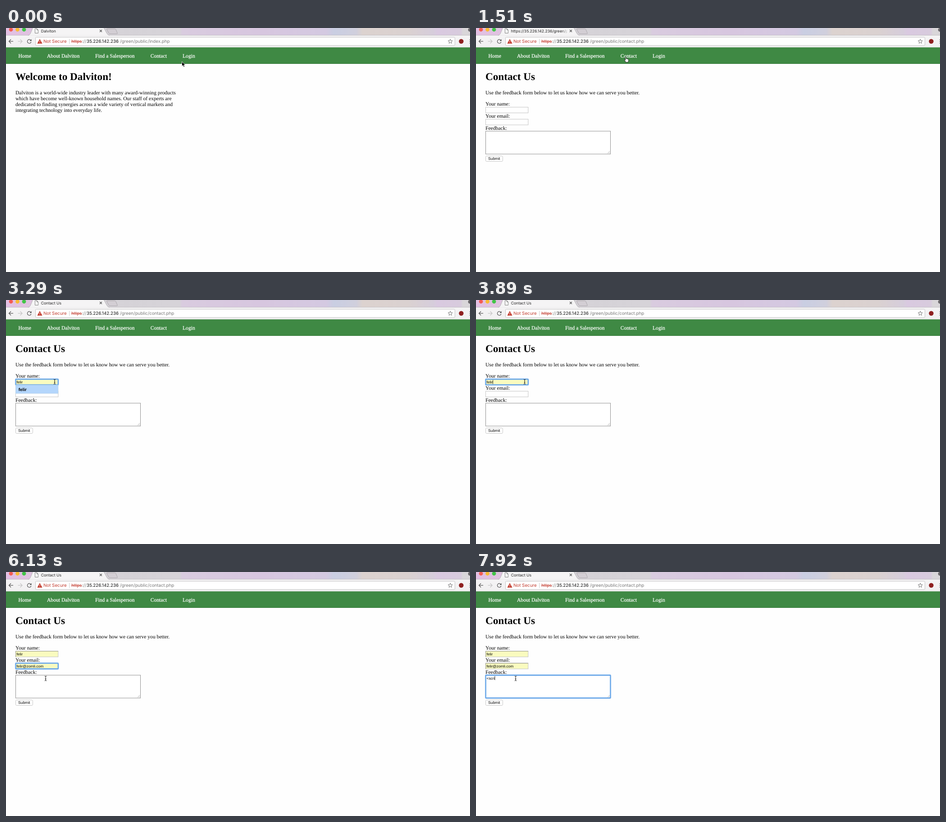
An HTML page for the animation above (8 s loop, 1030 by 544 pixels).

```html
<!DOCTYPE html>
<html lang="en">
<head>
<meta charset="utf-8">
<title>Contact form</title>
<style>
  html, body { margin: 0; width: 100%; height: 100%; overflow: hidden; background: #fefefe; }
  svg { display: block; width: 1030px; height: 544px; text-rendering: geometricPrecision; }
  .page text { font: 11.6px "Liberation Serif", "Times New Roman", serif; }
  .page .h1 { font-size: 23.2px; font-weight: bold; }
  .nav text { fill: #fff; stroke: #fff; stroke-width: .25px; }
  .ui text { font: 9.75px Inter, Roboto, sans-serif; }
  .ui .title { font-size: 8.6px; fill: #222; }
  .page .field { font: 8.4px "Liberation Sans", Arial, sans-serif; }
  .page .pick { font: bold 9.8px "Liberation Sans", Arial, sans-serif; }
  .line { fill: none; stroke: #5a5a5a; stroke-width: 1.3; }
  .ring { fill: none; stroke: #5b9ee6; stroke-width: 1.8; }
  .glow { fill: none; stroke: #a9cdf3; stroke-width: 3.4; opacity: .7; }
  .caret { stroke: #000; stroke-width: .8; }
</style>
</head>
<body>
<svg viewBox="0 0 1030 544">
  <defs>
    <linearGradient id="strip">
      <stop offset="0" stop-color="#e3bfe3"/>
      <stop offset=".055" stop-color="#dfc3e0"/>
      <stop offset=".2" stop-color="#d5d2d7"/>
      <stop offset=".374" stop-color="#d6d3d8"/>
      <stop offset=".38" stop-color="#d9cbdf"/>
      <stop offset=".55" stop-color="#d7c6df"/>
      <stop offset=".69" stop-color="#d4c9e1"/>
      <stop offset=".707" stop-color="#c9cee2"/>
      <stop offset=".755" stop-color="#d0cfdd"/>
      <stop offset=".768" stop-color="#dcd2cf"/>
      <stop offset=".865" stop-color="#dad1d0"/>
      <stop offset=".92" stop-color="#d6cddb"/>
      <stop offset=".93" stop-color="#d9c9e0"/>
      <stop offset=".98" stop-color="#d8cbdd"/>
      <stop offset=".985" stop-color="#d9d6d9"/>
    </linearGradient>
    <linearGradient id="bar" x2="0" y2="1">
      <stop offset="0" stop-color="#f5f4f5"/>
      <stop offset="1" stop-color="#f1f0f1"/>
    </linearGradient>
    <linearGradient id="fade">
      <stop offset="0" stop-color="#f5f4f5" stop-opacity="0"/>
      <stop offset="1" stop-color="#f5f4f5"/>
    </linearGradient>
    <clipPath id="titleClip"><rect x="76" width="127" height="16"/></clipPath>
  </defs>

  <g class="page">
    <rect width="1030" height="544" fill="#fefefe"/>
    <g class="nav">
      <rect y="43" width="1030" height="37" fill="#3f8944"/>
      <rect y="79" width="1030" height="1" fill="#377a3c"/>
      <text x="27.5" y="66">Home</text>
      <text x="91" y="66">About Dalviton</text>
      <text x="198" y="66">Find a Salesperson</text>
      <text x="320.8" y="66">Contact</text>
      <text x="392" y="66">Login</text>
    </g>

    <g id="home">
      <text class="h1" x="21" y="116.3">Welcome to Dalviton!</text>
      <text x="21" y="148">Dalviton is a world-wide industry leader with many award-winning products</text>
      <text x="21" y="161">which have become well-known household names. Our staff of experts are</text>
      <text x="21" y="174">dedicated to finding synergies across a wide variety of vertical markets and</text>
      <text x="21" y="187">integrating technology into everyday life.</text>
    </g>

    <g id="contact">
      <text class="h1" x="21" y="116.3">Contact Us</text>
      <text x="21" y="148">Use the feedback form below to let us know how we can serve you better.</text>
      <text x="21" y="173">Your name:</text>
      <text x="21" y="200">Your email:</text>
      <text x="21" y="226.7">Feedback:</text>
      <rect x="21.5" y="230" width="277" height="51" fill="#fff" stroke="#8f8f8f"/>
      <path d="M292 279.5l5-5M295 279.5l2-2" stroke="#999" stroke-width=".8"/>
      <rect x="21.5" y="285.3" width="37.8" height="12.2" rx="2.2" fill="#fff" stroke="#c6c6c6"/>
      <text class="field" x="27" y="294.2" style="font-size:8.5px">Submit</text>
      <g id="form"></g>
    </g>
  </g>

  <g class="ui">
    <rect width="1030" height="17" fill="url(#strip)"/>
    <rect y="16" width="1030" height="27" fill="url(#bar)"/>
    <path d="M0 16.2H1030" stroke="#b5b2b6" stroke-width=".8"/>
    <path d="M0 43H1030" stroke="#c9d3c9" stroke-width=".6"/>
    <path d="M49 16.7C53 16 54.5 12 56 8L59.5 -1H217L223.500 11.500Q226 16 230 16.700Z" fill="#f5f4f5"/>
    <path d="M49 16.300C53 16 54.500 12 56 8L59.500 -1M217 -1L223.500 11.500Q226 16 230 16.300" fill="none" stroke="#a5a2a6" stroke-width=".8"/>
    <path d="M224.500 1.800H241.500Q243 1.800 243.800 3.300L247.300 11.500Q247.800 13 246 13H231Q229 13 228.200 11.500L223.600 3Q223.200 1.800 224.500 1.800Z" fill="#d3ced4" stroke="#a19ea2" stroke-width=".8"/>
    <circle cx="11" cy="3.500" r="4.400" fill="#f45d55"/>
    <circle cx="25.500" cy="3.500" r="4.400" fill="#f8bc34"/>
    <circle cx="40" cy="3.500" r="4.400" fill="#42c549"/>
    <path d="M64.500 1.500H68.500L71.300 4.300V11.500H64.500ZM68.500 1.500V4.300H71.300" fill="#fff" stroke="#707070" stroke-width=".9"/>
    <g clip-path="url(#titleClip)"><text class="title" id="title" x="77.700" y="9.500"></text></g>
    <rect x="190" y="1" width="14" height="14" fill="url(#fade)"/>
    <path d="M208 4l5 5m0-5l-5 5" stroke="#555" stroke-width="1.200"/>
    <circle cx="1030" cy="4" r="4.300" fill="#6b696c"/>

    <path class="line" d="M16 29.700H6.700M11 25.200L6.500 29.700L11 34.200"/>
    <path class="line" d="M26.500 29.700H35.800M31.500 25.200L36 29.700L31.500 34.200" style="stroke:#c6c5c6"/>
    <path class="line" d="M55.300 27.500A4.300 4.300 0 1 0 55.800 31"/>
    <path d="M56.600 24.800V29H52.400Z" fill="#5a5a5a"/>
    <rect x="65.500" y="20.500" width="931" height="18.500" rx="2" fill="#fff" stroke="#bdbbbd" stroke-width=".9"/>
    <path d="M75 25L80.200 34.500H69.800Z" fill="#c23a2d" stroke="#c23a2d" stroke-width=".6" stroke-linejoin="round"/>
    <path d="M75 28.300v2.800m0 1v1.200" stroke="#fff" stroke-width="1.100"/>
    <text x="83" y="33.300" fill="#c23a2d">Not Secure</text>
    <path d="M140.800 24V35.500" stroke="#c9c9c9"/>
    <text x="145" y="33.300" fill="#c23a2d">https</text>
    <path d="M145 30.300H169" stroke="#c23a2d" stroke-width=".9"/>
    <text x="168.800" y="33.300" fill="#777">://</text>
    <text x="179" y="33.300" fill="#111">35.226.142.236</text>
    <text id="path" x="253" y="33.300" fill="#777"></text>
    <path id="star" fill="none" stroke="#666" stroke-width=".9"/>
    <circle cx="1010.500" cy="29.800" r="5.200" fill="#8f2020"/>
    <path d="M1029.500 25.500v9" stroke="#777" stroke-width="1.600" stroke-dasharray="1.600 2.100"/>
  </g>

  <g id="pointer">
    <path id="arrow" d="M0 0V10.300L2.400 8L4 12L6 11.200L4.300 7.400H7.600Z" fill="#000" stroke="#fff" stroke-width=".8"/>
    <path id="hand" d="M-.900 .500Q0 -.800 .900 .500V4.200Q2 3.500 2.800 4.500Q4 3.900 4.600 5Q6 4.700 6.200 6V8.500Q6 10 5 11.800H0Q-1 9.500 -3 7.200Q-3 5.900 -1.800 6.300L-.900 7.200Z" fill="#fff" stroke="#111" stroke-width=".9"/>
    <path id="beam" d="M-2.200 -5.200Q0 -5.200 0 -4Q0 -5.200 2.200 -5.200M0 -4V4M-2.200 5.200Q0 5.200 0 4Q0 5.200 2.200 5.200M-1.300 1.200H1.300" fill="none" stroke="#111" stroke-width="1"/>
  </g>
</svg>
<script>
const LOOP = 8000;
const NAME = "felir", MAIL = "felir@zomli.com";
const $ = id => document.getElementById(id);
const show = (el, on) => el.setAttribute("visibility", on ? "inherit" : "hidden");

// pointer: time, shape, x, y
const moves = [
  [0, "arrow", 390.5, 75], [150, "arrow", 400, 75.5], [300, "arrow", 402.5, 75.5],
  [450, "arrow", 391, 72], [600, "arrow", 367, 63], [770, "arrow", 345, 58],
  [920, "hand", 327, 62], [1070, "hand", 332.5, 64.5],
  [1800, "arrow", 296, 88], [1950, "arrow", 190, 140], [2090, "beam", 108, 182.3],
  [5830, "beam", 102, 196], [5980, "beam", 91, 226], [6130, "beam", 88, 237.3]
];
const tabs = [[0, "Dalviton"], [1360, "https://35.226.142.236/green/public"], [1800, "Contact Us"]];

// fields: time, text, filled, list (1 open, 2 chosen), focus, caret
const nameSteps = [
  [0, "", 0, 0, 0, 0], [2240, "", 0, 0, 1, 1], [2840, NAME[0], 0, 1, 1, 1],
  [3290, NAME, 1, 2, 1, 0], [3890, NAME, 1, 0, 1, 1], [4190, NAME, 1, 0, 0, 0]
];
const mailSteps = [
  [0, "", 0, 0, 0, 0], [4190, "", 0, 0, 1, 1], [4640, MAIL[0], 0, 0, 1, 1],
  [4790, MAIL[0], 0, 1, 1, 1], [5090, MAIL, 1, 2, 1, 0], [5380, MAIL, 1, 0, 1, 1],
  [5830, MAIL, 1, 0, 1, 0], [6280, MAIL, 1, 0, 0, 0]
];
const noteSteps = [
  [0, "", 0, 0, 0, 0], [6280, "", 0, 0, 1, 1], [6720, "", 0, 0, 1, 0],
  ...[7020, 7320, 7470, 7770, 7920].map((t, i) => [t, "<scri".slice(0, i + 1), 0, 0, 1, 1])
];

const at = (steps, t) => steps.filter(s => s[0] <= t).pop();

function add(parent, tag, attrs, text) {
  const el = document.createElementNS("http://www.w3.org/2000/svg", tag);
  for (const k in attrs) el.setAttribute(k, attrs[k]);
  if (text) el.textContent = text;
  return parent.appendChild(el);
}

function makeField(y, w, h, base, choice) {
  const g = add($("form"), "g", {});
  const box = { x: 21.5, y, width: w, height: h };
  const f = {};
  if (choice) {
    f.back = add(g, "rect", { ...box, stroke: "#c4c4c4" });
    f.edge = add(g, "path", { d: `M21.5 ${y + h}V${y}H${21.5 + w}`, fill: "none", stroke: "#8f8f82" });
  }
  f.focus = add(g, "g", {});
  add(f.focus, "rect", { ...box, rx: 1, class: "glow" });
  add(f.focus, "rect", { ...box, rx: 1, class: "ring" });
  f.text = add(g, "text", { x: 23.5, y: base, class: "field" });
  f.caret = add(g, "path", { class: "caret" });
  if (choice) {
    const top = y + h + 0.5;
    f.list = add(g, "g", {});
    f.row = add(f.list, "rect", { x: 21.5, y: top, width: w, height: 18.5, stroke: "#b4d3ea", "stroke-width": 0.9 });
    add(f.list, "text", { x: 27.8, y: top + 13.4, class: "pick" }, choice);
  }
  f.base = base;
  return f;
}

function drawField(f, [, text, filled, list, focus, caret]) {
  f.text.textContent = text;
  show(f.focus, focus);
  show(f.caret, caret);
  const x = 24 + (text ? f.text.getComputedTextLength() : 0);
  f.caret.setAttribute("d", `M${x} ${f.base - 7.6}v9`);
  if (!f.back) return;
  f.back.setAttribute("fill", filled ? "#f9fbbf" : "#fff");
  show(f.edge, filled && !focus);
  show(f.list, list);
  f.row.setAttribute("fill", list === 2 ? "#b4d6fc" : "#fff");
}

// later lists lie over the fields below them
const note = makeField(230, 277, 51, 239.6);
const mail = makeField(203.3, 94.3, 12.7, 212.8, MAIL);
const name = makeField(176.5, 94.3, 12.7, 186, NAME);

$("star").setAttribute("d", "M" + Array.from({ length: 10 }, (_, i) => {
  const r = i % 2 ? 2.3 : 5.2, a = (i / 5 - 0.5) * Math.PI;
  return `${(986.3 + r * Math.cos(a)).toFixed(2)} ${(30 + r * Math.sin(a)).toFixed(2)}`;
}).join("L") + "Z");

function render(t) {
  const [, shape, x, y] = at(moves, t);
  for (const id of ["arrow", "hand", "beam"]) show($(id), id === shape);
  $("pointer").setAttribute("transform", `translate(${x} ${y})`);

  const loaded = t >= 1360;
  show($("home"), !loaded);
  show($("contact"), loaded);
  $("title").textContent = at(tabs, t)[1];
  $("path").textContent = `/green/public/${loaded ? "contact" : "index"}.php`;

  drawField(name, at(nameSteps, t));
  drawField(mail, at(mailSteps, t));
  drawField(note, at(noteSteps, t));
}

const start = performance.now();
function tick() {
  render((performance.now() - start) % LOOP);
  requestAnimationFrame(tick);
}
tick();
</script>
</body>
</html>
```
